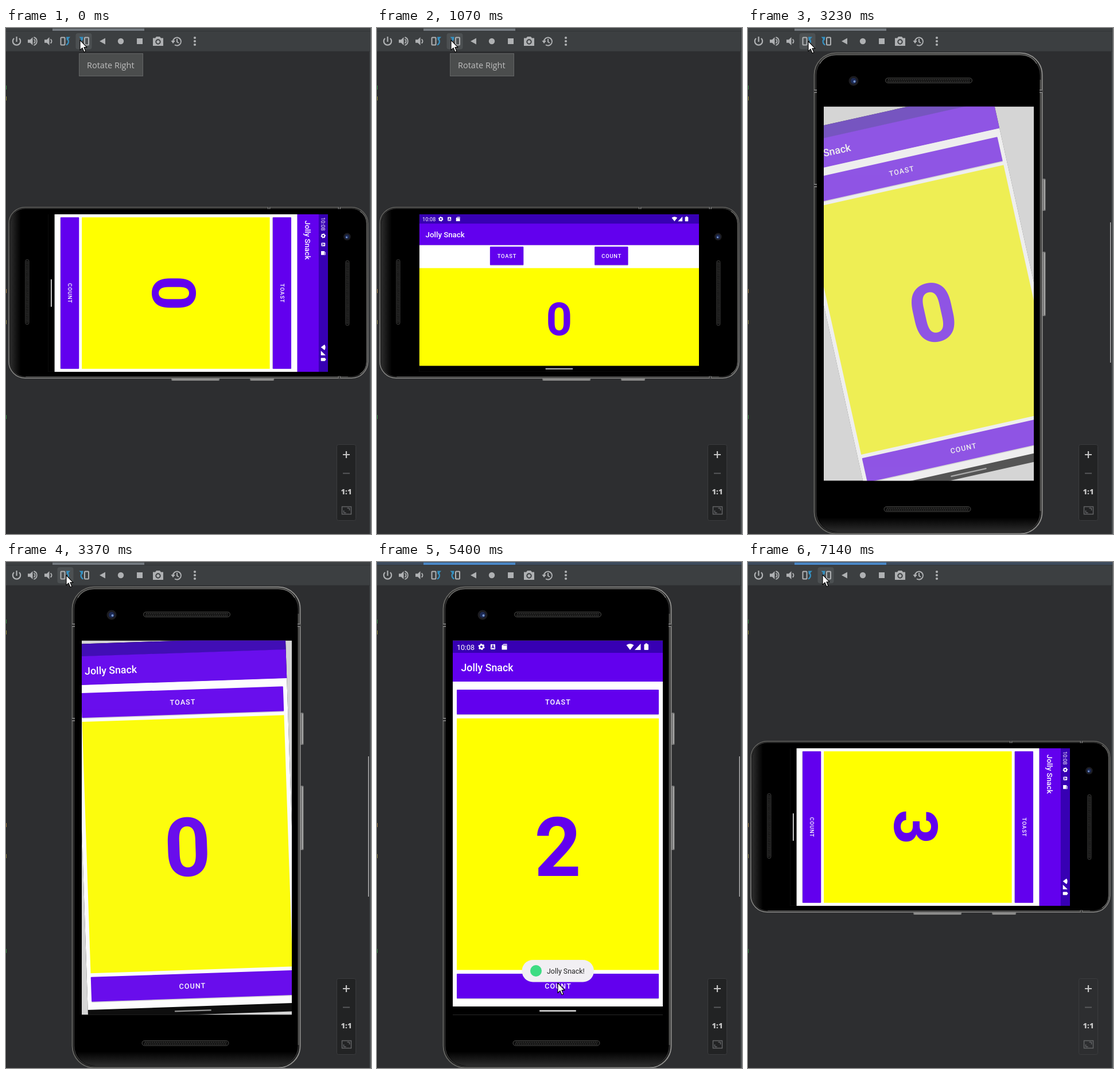
Animation, 636 px wide and 880 px high, one loop 8000 ms. Source, as an HTML page:

```html
<!DOCTYPE html>
<html lang="en">
<head>
<meta charset="utf-8">
<title>Emulator rotation</title>
<style>
html, body { margin: 0; width: 100%; height: 100%; overflow: hidden; background: #2d2e30; }
svg { display: block; width: 636px; height: 880px; }
text { font-family: Roboto, "Liberation Sans", sans-serif; }
.tip, .zoom { font-family: "Open Sans", "Noto Sans", sans-serif; }
</style>
</head>
<body>
<svg id="stage" viewBox="0 0 636 880" xmlns="http://www.w3.org/2000/svg"></svg>
<script>
const LOOP = 8000;
const TITLE = 'Jolly Snack';
const PURPLE = '#6200ee';
const GREY = '#afb1b3';
const BLUE = '#3592c4';

const rect = (x, y, w, h, fill, more = '') =>
  `<rect x="${x}" y="${y}" width="${w}" height="${h}" fill="${fill}" ${more}/>`;
const text = (x, y, size, weight, fill, body, more = '') =>
  `<text x="${x}" y="${y}" font-size="${size}" font-weight="${weight}" fill="${fill}" ${more}>${body}</text>`;
const at = (x, y, body) => `<g transform="translate(${x} ${y})">${body}</g>`;
const line = (d, color, width = 2) =>
  `<path d="${d}" fill="none" stroke="${color}" stroke-width="${width}"/>`;
const shape = (d, fill) => `<path d="${d}" fill="${fill}"/>`;
const middle = 'text-anchor="middle"';

// ---- App screens, drawn in their own coordinates ----

function statusIcons(w) {
  return `<g class="icons">
    ${text(7, 16, 12.5, 400, '#fff', '10:08')}
    ${at(50, 11, '<circle r="3.3" fill="none" stroke="#fff" stroke-width="2.6"/>' +
      '<circle r="4.8" fill="none" stroke="#fff" stroke-width="1.6" stroke-dasharray="2.5 2.53"/>')}
    ${at(70, 11, rect(-4, -4.5, 8, 9, '#fff', 'rx="1"') + line('M-2.2 3L0-3L2.2 3M-1.5 1.2H1.5', '#3700b3', 1.2))}
    ${at(90, 11, shape('M-4.5-2L-1.5-5H4.5V5H-4.5Z', '#fff') + line('M-1-4V-1.6M1-4V-1.6M3-4V-1.6', '#3700b3', .9))}
    ${shape(`M${w - 63.5} 8Q${w - 57} 3.500 ${w - 50.5} 8L${w - 57} 16.500Z`, '#fff')}
    ${shape(`M${w - 49} 16.500H${w - 38.5}V5.500Z`, '#fff')}
    ${rect(w - 32.5, 6.5, 7.5, 10, '#fff', 'rx="1"')}${rect(w - 30.5, 5, 3.5, 2, '#fff')}
  </g>`;
}

function button(x, y, w, label) {
  return rect(x, y + 1, w, 43.5, '#000', 'opacity=".16" rx="1"') +
    rect(x, y, w, 43, PURPLE, 'rx="1"') +
    text(x + w / 2 + .5, y + 26, 12.5, 500, '#fff', label, `${middle} letter-spacing="1.1"`);
}

function app(id, w, h, content) {
  return `<g id="${id}">
    ${rect(0, 0, w, h, '#000')}${rect(0, 71, w, h - 85.5, '#fff')}
    ${rect(0, 0, w, 22, '#3700b3')}${rect(0, 21.5, w, 50, PURPLE)}
    ${statusIcons(w)}${text(14.5, 53.5, 17.8, 500, '#fff', TITLE)}
    ${content}
    ${rect(w / 2 - 32, h - 8, 64, 2.2, '#f0f0f0', 'class="pill" rx="1"')}
  </g>`;
}

const toast = `<g id="toast">
  ${rect(120.5, 555.5, 125.5, 38.5, '#f1eff3', 'rx="19.2"')}
  <circle cx="145" cy="574.5" r="10" fill="#3ddc84"/>
  ${text(164, 579, 12.4, 400, '#222', TITLE + '!')}
</g>`;

const tall = app('tall', 366, 651,
  button(7, 85.5, 352, 'TOAST') + rect(7, 135.5, 352, 437.5, '#ff0') +
  text(183, 409.5, 142, 700, PURPLE, '0', `id="count" ${middle}`) +
  button(7, 579.5, 352, 'COUNT') + toast);

const wide = app('wide', 651, 366,
  button(164.5, 75, 78, 'TOAST') + button(408, 75, 78, 'COUNT') +
  rect(0, 125, 651, 227, '#ff0') +
  text(325.5, 280, 106.5, 700, PURPLE, '0', middle));

// ---- Phone ----

const speaker = (x, y) => rect(x, y, 151, 8.5, '#0c0c0c', 'rx="4.2" stroke="#4c4c4a"') +
  line(`M${x + 5} ${y + 2.800}H${x + 147}M${x + 4} ${y + 5.700}H${x + 147}`, '#50504e', 1.6)
    .replace('/>', ' stroke-dasharray="1.6 1.6"/>');

const sideKey = (y, h) => rect(513, y, 5.5, h, '#777', 'rx="1.5"') + rect(516, y + 2, 1.5, h - 4, '#b4b4b2');
const tick = (x, y) => rect(x, y, 5, 6, '#777') + rect(x, y + 2, 5, 2, '#222');

const phone = `<g id="phone">
  ${sideKey(262, 56)}${sideKey(389, 112)}
  ${rect(115.5, 43.5, 397, 836, '#151515', 'rx="38" stroke="url(#rim)" stroke-width="2"')}
  ${rect(118.5, 46, 391, 831, '#000', 'rx="36" stroke="#353535" stroke-width="1.5"')}
  ${line('M509.500 90V840', '#686866', 1.5)}
  ${line('M125 62Q134 46.500 154 46.500H474Q494 46.500 503 62', '#6f6f6d', 1.5)}
  ${shape('M121 835Q124 850 142 852H488Q505 850 508 835Q508 875 474 876H156Q121 875 121 835Z', 'url(#sheen)')}
  ${tick(115, 107)}${tick(115, 271)}${tick(508, 107)}
  ${speaker(239.5, 87)}${speaker(237, 832.5)}
  <circle cx="184" cy="92" r="8.5" fill="#1c1c20"/>
  <circle cx="184" cy="92" r="5" fill="#1c2a55"/><circle cx="185.500" cy="93" r="2" fill="#7898d0"/>
  <g clip-path="url(#screen)">
    ${rect(132, 136.5, 366, 651, '#d5d5d5')}${tall}${wide}
  </g>
</g>`;

// ---- Emulator window ----

const speakerIcon = shape('M-7-2.800H-3L1.500-7V7L-3 2.800H-7Z', GREY);
const rotateIcon = rect(-7.5, -6.5, 7, 13, 'none', `rx="1" stroke="${GREY}" stroke-width="2"`) +
  line('M4-4A6.500 6.500 0 0 1 2 6.500', BLUE, 2.2) + shape('M2-7.500H9L3-1Z', BLUE);

const toolbar = rect(0, 0, 636, 40, '#3c3f41') + rect(0, 40, 636, 1, '#343638') +
  rect(0, 0, 636, 5, '#3c3f41', 'id="strip"') + rect(0, 5, 636, 1, '#323436') +
  rect(81, 1, 160, 4, '#747a80', 'id="tab"') +
  rect(89.5, 9, 28, 28, '#4c5052', 'id="hoverLeft" rx="4"') +
  rect(121.5, 9, 28, 28, '#4c5052', 'id="hoverRight" rx="4"') +
  at(18.5, 23, line('M-4.500-5A6.700 6.700 0 1 0 4.500-5M0-8V1', GREY, 2.2)) +
  at(45, 23, speakerIcon + line('M3.500-3.500A4 4 0 0 1 3.500 3.500M3.500-7A7.300 7.300 0 0 1 3.500 7', GREY, 1.9)) +
  at(74, 23, speakerIcon + line('M3.500-3.500A4 4 0 0 1 3.500 3.500', GREY, 1.9)) +
  at(103, 23, rotateIcon) + at(136.5, 23, `<g transform="scale(-1 1)">${rotateIcon}</g>`) +
  shape('M173 17.500V28.500L163 23Z', GREY) +
  `<circle cx="200" cy="23" r="5.2" fill="${GREY}"/>` + rect(228, 18, 10, 10, GREY) +
  at(265, 23, shape('M-9-5.500H-5L-3-8H3L5-5.500H9V8H-9Z', GREY) +
    `<circle cy="1" r="3.7" fill="${GREY}" stroke="#3c3f41" stroke-width="2"/>`) +
  at(297, 23, line('M-6 0A7 7 0 1 1-3 6.300M1-4V1L4 3', GREY, 2) + shape('M-9.500-1H-2L-6 4Z', GREY)) +
  [17, 23, 29].map(y => `<circle cx="329" cy="${y}" r="2.100" fill="${GREY}"/>`).join('');

const zoom = rect(576.5, 724.5, 33, 132, '#222324', 'id="panel" rx="3" stroke="#3b3c3e"') +
  line('M587 742H599M593 736V748', '#c4c4c4', 2.2) + line('M587 774.500H599', '#5c5d5f', 1.8) +
  text(593, 811, 13, 800, '#c4c4c4', '1:1', `class="zoom" ${middle}`) +
  rect(585.5, 832.5, 16, 13, 'none', 'stroke="#626365" stroke-width="1.5"') +
  line('M588.500 843V839M588.500 843H592.500M598.500 835V839M598.500 835H594.500', '#626365', 1.5);

const edges = rect(0, 41, 1, 839, '#242527') + rect(633, 41, 2, 839, '#3c3f41') + rect(635, 0, 1, 880, '#626466') +
  [[103, '#2f8a3c'], [122, '#8f8a30'], [457, '#a07a3c'], [511, '#8a8040'], [676, '#2f8a3c']]
    .map(([y, c]) => rect(0, y - 3, 1, 7, c)).join('') +
  rect(631, 338, 1.2, 244, '#c8c8c8', 'id="scroll"');

const tooltip = `<g id="tooltip">${rect(127.5, 44.5, 111, 39, '#4b4d4d', 'stroke="#646666"')}
  ${text(141, 70, 14.5, 400, '#bfbfbf', 'Rotate Right', 'class="tip"')}</g>`;

const pointer = `<path id="cursor" d="M0 0V17.500L4-3.500ZM0 0V17.500L4 13.700L7 20.700L9.800 19.500L6.900 12.600H12Z"
  fill="#fff" stroke="#000" stroke-width="1.100" stroke-linejoin="round"/>`.replace('M0 0V17.500L4-3.500Z', '');

document.getElementById('stage').innerHTML = `<defs>
  <linearGradient id="rim"><stop stop-color="#62625f"/><stop offset="1" stop-color="#8e8e8c"/></linearGradient>
  <linearGradient id="sheen" x2="0" y2="1"><stop offset=".4" stop-color="#000"/><stop offset="1" stop-color="#2c2c2c"/></linearGradient>
  <clipPath id="screen">${rect(132, 136.5, 366, 651, '#000')}</clipPath>
</defs>` + rect(0, 0, 636, 880, '#2d2e30') + toolbar + edges + phone + zoom + tooltip + pointer;

// ---- Motion ----

const ticks = [[0, 1], [530, 1], [680, 2], [950, 2], [1310, 1], [1450, 2], [1710, 1], [1860, 2],
  [3230, 1], [3370, 1], [3510, 1], [3660, 2], [3930, 4], [4440, 7], [5280, 7], [6150, 6], [6900, 3]]
  .flatMap(([start, n]) => Array.from({ length: n }, (_, i) => start + i * 120));

// Pointer path: time, x, y
const path = [[0, 129, 21], [1070, 129, 21], [1310, 126, 23], [1450, 114, 24], [1570, 106, 22], [1710, 105, 23],
  [3370, 105, 23], [3510, 134, 54], [3660, 190, 120], [3780, 240, 185], [3930, 288, 236], [4050, 299, 244],
  [4170, 298, 252], [4290, 293.5, 291.5], [4560, 300, 470], [4800, 311, 680], [5040, 315, 732],
  [5640, 315, 732], [5760, 300, 600], [5880, 265, 310], [6000, 230, 140], [6150, 190, 112], [6390, 161, 95],
  [6630, 118, 48], [6750, 106, 26], [6900, 130, 22], [8000, 130, 22]];

const $ = id => document.getElementById(id);
const clamp = v => Math.max(0, Math.min(1, v));
const show = (id, on) => $(id).setAttribute('display', on ? 'inline' : 'none');
const set = (id, name, value) => $(id).setAttribute(name, value);
const setAll = (selector, value) =>
  document.querySelectorAll(selector).forEach(n => n.setAttribute('opacity', value));

function pointerAt(t) {
  const i = Math.max(1, path.findIndex(p => p[0] > t));
  const [a, b] = [path[i - 1], path[i]];
  const k = (t - a[0]) / (b[0] - a[0]);
  return [a[1] + (b[1] - a[1]) * k, a[2] + (b[2] - a[2]) * k];
}

function draw(time) {
  const t = ticks.filter(s => s <= time).pop();
  const sideways = t < 1860 || t >= 7020;
  const wideApp = t >= 530 && t < 3230;
  set('phone', 'transform', sideways ? 'matrix(0 .7485 -.7485 0 663.2 225.2)' : '');
  show('scroll', !sideways);

  // The new layout swings in and fades over a pale wash.
  const since = t >= 3230 ? t - 3230 : t >= 530 ? t - 530 : LOOP;
  const left = since < 260 ? Math.exp(-since / 75) : 0;
  const angle = 12.6 * left * (wideApp ? 1 : -1);
  show('wide', wideApp);
  show('tall', !wideApp);
  set('wide', 'transform', `translate(132 787.5) rotate(-90) rotate(${angle} 325.5 183)`);
  set('tall', 'transform', `translate(132 136.5) rotate(${angle} 183 325.5)`);
  set('wide', 'opacity', 1 - .4 * left);
  set('tall', 'opacity', 1 - .4 * left);
  setAll('.icons', left ? 0 : 1);
  setAll('.pill', .6 + .4 * clamp((since - 150) / 350));

  $('count').textContent = t < 5280 ? 0 : t < 5400 ? 1 : t < 5640 ? 2 : 3;
  set('toast', 'opacity', clamp((t - 4320) / 240) * clamp((6630 - t) / 200));

  const [x, y] = pointerAt(t);
  set('cursor', 'transform', `translate(${x} ${y})`);
  const inBar = y > 9 && y < 37;
  show('hoverLeft', inBar && x > 89 && x < 118);
  show('hoverRight', inBar && x > 121 && x < 150);
  show('tooltip', t < 1710);

  const focused = t >= 4050;
  set('strip', 'fill', focused ? '#3d4b5c' : '#3c3f41');
  set('tab', 'fill', focused ? '#4a88c7' : '#747a80');
  set('panel', 'fill', t >= 7020 ? '#2d2e30' : '#222324');
}

const origin = performance.now();
function tickFrame() {
  draw((performance.now() - origin) % LOOP);
  requestAnimationFrame(tickFrame);
}
tickFrame();
</script>
</body>
</html>
```
